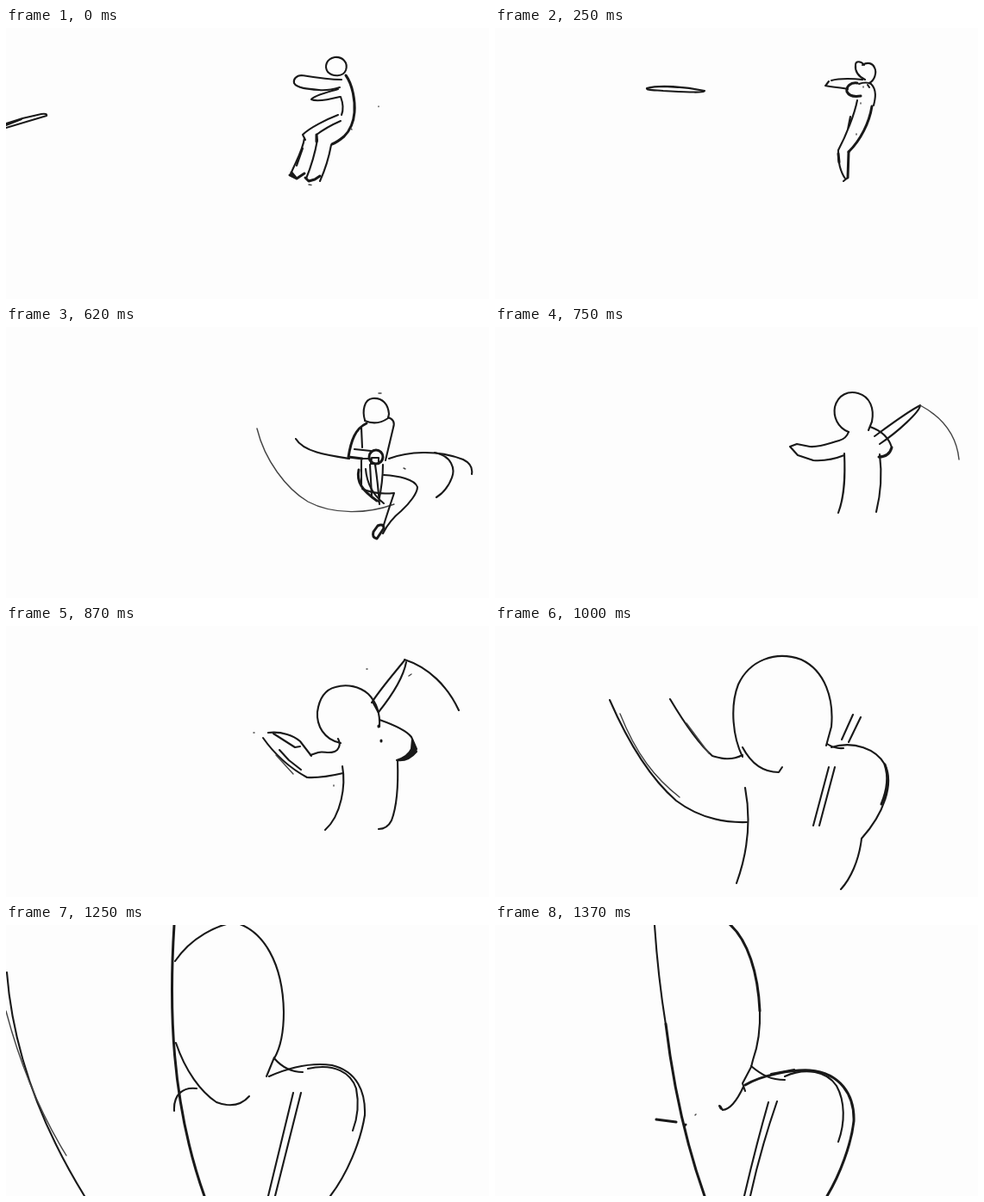
An HTML page that plays this animation: 560x315 px, repeating every 1500 ms.

```html
<!DOCTYPE html>
<html lang="en">
<head>
<meta charset="utf-8">
<title>Sketch loop</title>
<style>
html, body { margin: 0; width: 100%; height: 100%; overflow: hidden; background: #fdfdfd; }
svg { display: block; width: 100%; height: 100%; }
g { display: none; fill: none; stroke: #191919; stroke-width: 2.1; stroke-linecap: round; stroke-linejoin: round; }
g.on { display: inline; }
.b { stroke-width: 3; }
.t { stroke: #444; stroke-width: 1.4; }
.ink { fill: #191919; }
</style>
</head>
<body>
<svg viewBox="0 0 560 315">
<!-- leaning back, staff flying in -->
<g class="on">
  <path d="M0 111Q20 104 41 100Q48 99 47 102Q30 107 0 116M0 113L18 106"/>
  <path d="M381 34C371 36 369 45 373 51C379 57 391 57 394 49C397 40 390 33 381 34"/>
  <path d="M389 60C372 60 355 57 343 55C336 55 333 60 334 64C337 70 350 71 363 72C372 73 380 71 387 69"/>
  <path d="M387 80C375 83 360 86 354 83C356 79 372 75 385 71"/>
  <path class="b" d="M394 55C402 66 405 85 404 98C403 110 400 118 392 126C386 131 381 134 378 135"/>
  <path d="M388 80C391 88 391 96 389 101M385 101C372 106 352 116 344 124L347 130M388 108Q372 115 360 124L361 131"/>
  <path d="M346 128C344 143 335 157 330 170M344 140L337 160M361 130Q357 153 348 175M377 136Q373 158 364 178"/>
  <path class="b" d="M329 171L337 175L346 169M331 168L336 174M347 174L351 178L358 176L364 172M360 124v8"/>
  <path class="t" d="M351 182l3 .5M432 91v.5M400 117l1 1"/>
</g>
<!-- straightening up -->
<g>
  <path d="M77 90C95 84 125 78 143 79C145 82 110 89 90 92Q76 94 77 90"/>
  <path d="M405 36C395 38 393 47 397 53C403 60 415 59 418 51C420 42 414 35 405 36"/>
  <path d="M408 61C392 61 376 58 364 58C358 60 358 65 361 67C370 71 387 71 402 71"/>
  <path d="M405 80C395 82 384 84 380 79C382 74 395 71 406 70"/>
  <path class="b" d="M415 58C423 70 424 83 422 96C419 112 412 123 400 135"/>
  <path d="M404 83C405 92 401 101 397 105C387 113 376 122 371 133L374 139"/>
  <path d="M372 134C371 150 368 161 367 173M385 131Q382 154 377 176M400 135Q394 156 388 178"/>
  <path class="b" d="M366 173L373 176L378 172M377 177L383 179L388 175"/>
</g>
<!-- upright, reaching -->
<g>
  <path d="M176 70C190 66 220 68 243 73C243 76 215 74 195 73C182 72 175 72 176 70M196 68l16 1"/>
  <path d="M428 43C424 38 418 38 418 43C417 52 423 57 429 60M426 43C432 39 438 41 440 46C443 52 440 61 434 64"/>
  <path d="M390 61C400 58 418 59 426 60M383 67C392 69 402 69 409 71M387 62L384 66"/>
  <path class="b" d="M420 64C412 63 407 68 408 74C411 80 418 80 424 79"/>
  <path d="M422 65Q430 62 436 65C443 72 441 82 439 90M432 66l2 3"/>
  <path class="b" d="M437 91C434 110 424 130 410 144"/>
  <path d="M420 84C417 100 407 125 398 142C397 155 401 168 406 175M412 103L409 118M404 178L409 174"/>
  <path class="b" d="M410 144L409 174M398 146l1 10"/>
  <path class="t" d="M424 87v1M419 123v1M427 68v1"/>
</g>
<!-- catch -->
<g>
  <path d="M302 77C320 79 346 90 366 100C363 104 329 95 307 82Q300 79 302 77"/>
  <path d="M417 65C407 67 405 77 409 85C415 93 428 92 432 83C434 73 428 64 417 65"/>
  <path d="M411 90C397 91 378 92 366 94M409 102C395 104 381 104 368 103"/>
  <circle cx="364" cy="99" r="6"/>
  <path d="M429 89C438 95 446 101 454 103L464 105M428 103C437 107 446 112 458 112L464 105"/>
  <path class="b" d="M409 102C411 118 408 134 405 145M429 103C430 120 428 134 422 146"/>
  <path d="M405 143C400 160 402 178 405 190L413 192M419 149C414 164 413 179 414 192M422 146C436 157 438 169 431 181L423 184L416 169"/>
</g>
<!-- swing down -->
<g>
  <path d="M302 77C293 82 293 115 300 138C308 164 328 186 352 188"/>
  <path class="t" d="M399 71C382 85 368 105 369 123"/>
  <path d="M440 84C415 82 383 92 376 111"/>
  <path d="M400 117C395 107 397 94 411 92C424 92 428 99 426 108C425 113 423 117 419 120"/>
  <path class="t" d="M403 121l5 2M410 125l6-1M401 97l2-2"/>
  <path d="M398 115L385 114C375 120 365 129 360 136L363 143L369 150M388 123C380 128 374 133 371 139L379 147"/>
  <circle cx="373" cy="151" r="7"/>
  <path d="M367 152l8-2M370 157Q356 174 349 193M379 152C372 172 362 188 351 200"/>
  <path d="M427 111C434 117 440 123 448 127L472 131M425 127C433 131 440 134 447 135L473 137M472 131L488 129C487 134 484 138 480 139L471 137"/>
  <path class="b" d="M389 124C391 140 397 155 405 168"/>
  <path d="M424 127C422 140 421 150 422 160M398 164C399 180 404 197 410 206Q415 211 420 206"/>
  <path class="b" d="M418 164C418 180 420 190 425 199M423 155C435 160 451 170 454 180C457 189 449 197 442 193C435 188 430 180 426 178"/>
  <path d="M426 162Q438 166 444 174M424 166l4 14M421 187l6-3"/>
  <path class="t" d="M425 195l8 3M425 204l5-2M425 183l3 10"/>
</g>
<!-- staff swept behind -->
<g>
  <path class="t" d="M291 118C300 155 325 188 350 203C380 219 420 217 450 206"/>
  <path d="M336 130C345 145 372 149 398 153M444 153C465 145 500 142 530 154Q542 160 540 171"/>
  <path d="M497 146C517 150 521 165 517 175C513 186 507 193 499 198"/>
  <path d="M416 108C413 98 415 84 425 83C437 82 443 90 444 101L443 106Q430 115 416 109"/>
  <path d="M443 105Q452 108 449 117C446 130 443 142 440 155M412 117L413 140"/>
  <path class="b" d="M418 112C405 118 400 132 397 151L413 153"/>
  <path d="M404 142L423 144M413 153l8 0"/>
  <circle class="b" cx="429" cy="151" r="8"/>
  <path d="M424 152h8v7h-9ZM422 160L424 196M428 160Q431 180 433 206M437 160Q437 180 432 203M412 155L412 185"/>
  <path class="b" d="M409 166C406 180 413 190 430 202"/>
  <path d="M417 165Q419 190 438 205M438 172C455 173 474 177 477 186C477 193 468 205 458 214C448 222 442 230 437 240"/>
  <path d="M413 188C425 194 440 194 450 193C446 205 441 220 438 230"/>
  <path class="b" d="M426 238Q424 245 430 246L438 234Q438 228 431 231Z"/>
  <path class="t" d="M461 164l2 1M432 77h3"/>
</g>
<!-- turning away, closer -->
<g>
  <path d="M410 122C397 117 392 104 394 93C398 78 410 74 421 77C435 81 440 95 437 110L433 120"/>
  <path d="M410 122Q407 130 399 132C385 136 376 140 365 139L350 136L342 139L351 149L369 155C383 156 395 153 405 149"/>
  <path d="M405 147C406 170 406 195 398 216M446 148C449 172 447 195 442 215"/>
  <path d="M435 116C449 121 457 130 460 140"/>
  <path class="b" d="M460 140Q457 151 445 151"/>
  <path d="M440 127C455 116 479 98 493 91C493 98 467 122 446 136"/>
  <path class="t" d="M493 91C519 105 535 125 538 154"/>
</g>
<!-- back view -->
<g>
  <path d="M388 136C368 132 360 115 361 100C363 85 370 74 382 71C395 67 410 70 420 79C428 87 434 100 433 117"/>
  <path d="M385 131Q389 138 384 144C378 150 368 145 362 147L353 150"/>
  <path d="M304 124C320 122 334 128 341 134L354 151M298 130C305 140 320 160 349 176C363 177 378 174 391 171"/>
  <path d="M310 125L335 141L341 140M317 144L328 156L342 167"/>
  <path class="t" d="M313 150L333 172"/>
  <path d="M390 163C394 185 389 220 370 237M454 157C455 185 453 210 447 226Q442 236 432 236"/>
  <path d="M433 109C450 115 464 121 470 129L476 143"/>
  <path class="ink" d="M471 132L476 146Q466 158 453 156Q466 152 470 143Z"/>
  <path d="M462 40C450 55 435 72 424 89M464 42C461 58 448 80 432 100M425 88L432 101"/>
  <path d="M462 39C490 48 512 70 525 98"/>
  <path class="t" d="M467 58l3-2M418 50h1M287 124h1M380 186v-1"/>
  <path class="b" d="M435 133v1M432 116v1"/>
</g>
<!-- arm rising -->
<g>
  <path d="M287 152C276 130 272 94 282 68C295 40 325 28 355 39C383 52 393 85 390 117L384 139"/>
  <path d="M287 141C297 160 310 170 329 170L333 164"/>
  <path d="M287 150C273 157 263 154 252 151C235 136 219 112 203 85M133 86C153 132 178 175 210 203C235 222 261 229 292 228"/>
  <path class="t" d="M145 102C164 150 186 177 214 199M222 113L248 148"/>
  <path d="M290 188C297 225 293 263 280 299"/>
  <path d="M385 137Q394 143 404 142M390 141C416 133 442 143 452 161C463 183 451 218 425 247C422 273 412 294 401 306"/>
  <path class="b" d="M452 161Q459 181 448 207"/>
  <path d="M402 132L415 103M410 135L424 106M387 164L369 232M394 164L376 232"/>
</g>
<!-- close on the shoulder -->
<g>
  <path d="M15 0C16 70 32 95 48 152"/>
  <path d="M26 10C20 50 22 120 38 160C52 205 92 267 130 315"/>
  <path d="M52 169L87 235L113 276M95 247C118 275 142 302 172 315"/>
  <path class="t" d="M70 229L98 262M34 11l5 8M188 50C186 75 190 110 200 130"/>
  <path class="b" d="M198 55C190 90 187 175 191 200C196 245 206 285 220 315"/>
  <path d="M206 1C202 15 202 30 192 56M183 254L214 315M195 208L201 276"/>
  <path d="M192 54C205 35 230 20 246 12C272 -2 303 0 325 20C343 42 351 75 351 108C350 130 345 145 340 152"/>
  <path class="b" d="M308 11C320 14 330 30 336 44M346 98Q350 112 346 126"/>
  <path d="M195 122C205 150 218 178 238 194"/>
  <path class="b" d="M218 176C232 196 252 208 272 205Q278 203 278 197"/>
  <path class="t" d="M222 182Q238 197 262 203M233 209v4"/>
  <path class="b" d="M194 208C190 190 200 178 215 178L222 184"/>
  <path d="M200 208C198 195 204 184 217 182M192 169L204 190"/>
  <path d="M341 147Q352 158 372 160M345 161C375 150 405 149 420 158C438 170 438 195 432 215C423 250 397 290 366 315"/>
  <path d="M373 157C400 147 420 157 424 178Q428 198 421 217M406 276L420 250"/>
  <path d="M360 180Q346 230 335 276M367 180Q351 230 341 276M328 269Q316 277 291 315"/>
  <circle class="ink" cx="194" cy="309" r="1.5"/>
</g>
<!-- drifting closer -->
<g>
  <path d="M1 55C8 145 40 232 91 315"/>
  <path class="t" d="M0 100Q25 195 70 268"/>
  <path class="b" d="M195 0C189 95 191 205 230 315"/>
  <path d="M196 42C215 14 245 0 265 -3C299 6 321 45 322 101C322 126 318 143 311 155"/>
  <path d="M197 137C208 170 226 194 244 206Q268 215 282 199M195 216C194 197 205 188 221 190"/>
  <path d="M311 154L302 176M311 155Q325 171 344 171"/>
  <path d="M305 176C332 164 357 160 378 163C407 170 417 194 416 221C411 253 395 290 376 315"/>
  <path d="M350 167C381 160 400 172 406 190Q411 215 402 239"/>
  <path d="M333 195L304 315M342 195L312 315"/>
</g>
<!-- nearest -->
<g>
  <path class="b" d="M198 115C206 182 220 250 243 315"/>
  <path d="M185 0C188 45 193 85 198 116"/>
  <path class="b" d="M272 -1C293 18 305 55 307 100"/>
  <path d="M307 98C308 125 304 143 299 157L297 165L287 184L290 193M260 210L264 215Q276 214 288 188"/>
  <path d="M297 164C310 175 320 180 336 180"/>
  <path class="b" d="M290 186C310 174 345 168 365 169C400 172 417 197 416 228C413 255 400 290 385 315"/>
  <path d="M336 176C360 165 385 170 396 187C406 205 406 230 398 252M320 173L347 168"/>
  <path d="M317 206Q303 255 289 315M327 205Q308 260 296 315"/>
  <path class="b" d="M187 226L210 229M220 233l1-1M261 211l1 2"/>
  <path class="t" d="M232 221l1-1"/>
</g>
</svg>
<script>
const poses = document.querySelectorAll("g");
const starts = [0, 120, 250, 370, 500, 620, 750, 870, 1000, 1120, 1250, 1370];
const loop = 1500;
let shown = 0;

function draw() {
  const t = performance.now() % loop;
  const next = starts.findLastIndex(s => s <= t);
  if (next !== shown) {
    poses[shown].classList.remove("on");
    poses[next].classList.add("on");
    shown = next;
  }
  requestAnimationFrame(draw);
}
draw();
</script>
</body>
</html>
```
